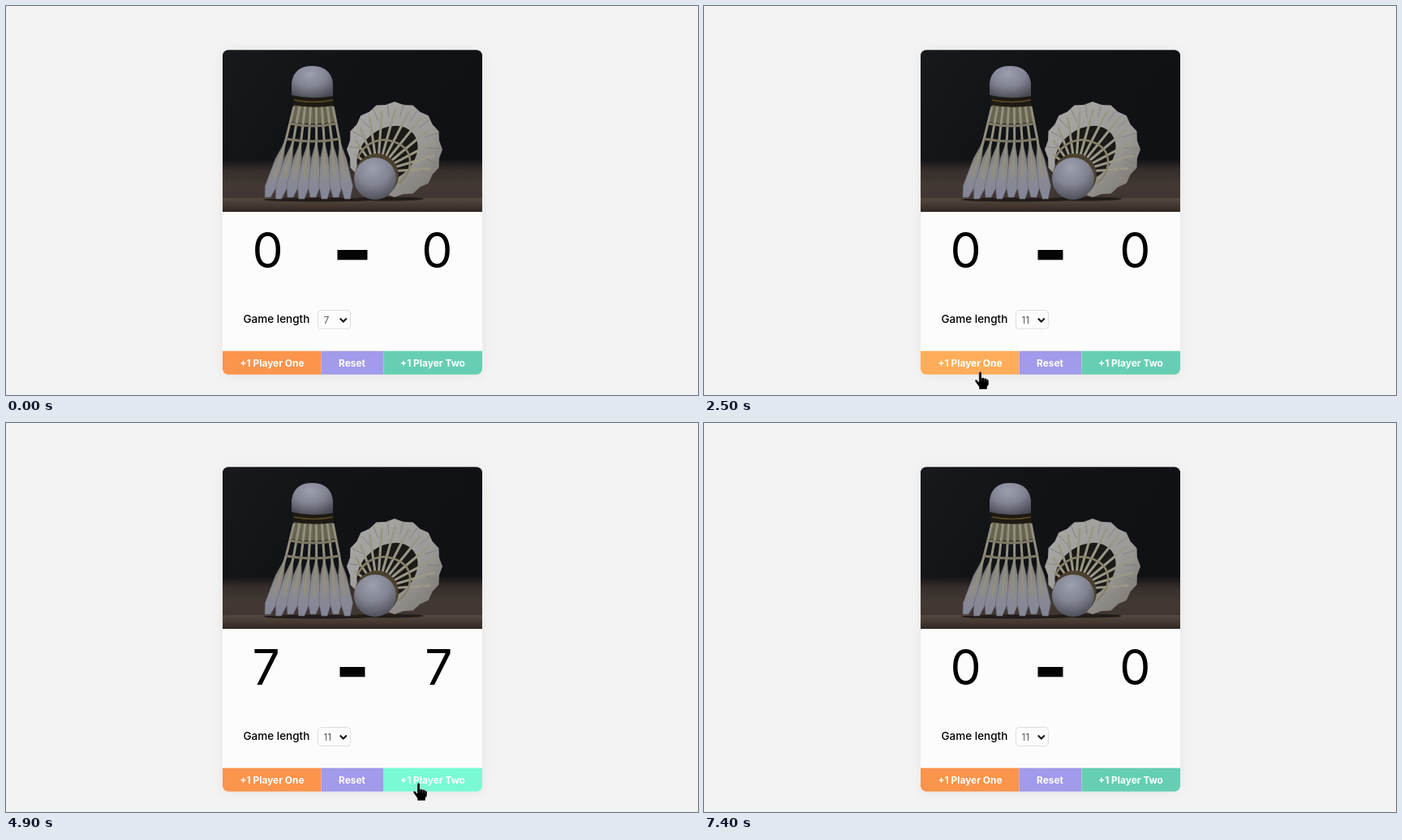
Write an HTML page that moves like this. It is 853 px wide and 480 px high and loops after 7.5 s.

```html
<!DOCTYPE html>
<html lang="en">
<head>
<meta charset="utf-8">
<title>Score keeper</title>
<style>
  html, body { margin: 0; width: 100%; height: 100%; overflow: hidden; background: #f3f3f3; }
  svg { display: block; width: 853px; height: 480px; font-family: Inter, Roboto, sans-serif; }
  .card { filter: drop-shadow(0 1px 7px rgba(0, 0, 0, .06)); }
  .score { font-size: 60.5px; letter-spacing: 3px; }
  .label { font-size: 13.5px; font-weight: 500; }
  .btn { font-size: 11.9px; font-weight: 700; fill: #fff; text-anchor: middle; }
</style>
</head>
<body>
<svg viewBox="0 0 853 480">
  <defs>
    <clipPath id="round"><rect x="267" y="54.3" width="320" height="400.4" rx="7"/></clipPath>
    <linearGradient id="wall" x2="1" y2=".3">
      <stop offset="0" stop-color="#18191d"/><stop offset=".45" stop-color="#121317"/><stop offset="1" stop-color="#101115"/>
    </linearGradient>
    <linearGradient id="ground" x2="0" y2="1">
      <stop offset="0" stop-color="#151417"/><stop offset=".2" stop-color="#352e2b"/>
      <stop offset=".5" stop-color="#433934"/><stop offset="1" stop-color="#3c332e"/>
    </linearGradient>
    <linearGradient id="wood" x2="0" y2="1">
      <stop offset="0" stop-color="#54493f"/><stop offset=".5" stop-color="#453a32"/><stop offset="1" stop-color="#2f2722"/>
    </linearGradient>
    <linearGradient id="vane" gradientUnits="userSpaceOnUse" x1="0" y1="165" x2="0" y2="238">
      <stop offset="0" stop-color="#7d7a6c"/><stop offset=".5" stop-color="#8b8b8e"/><stop offset="1" stop-color="#83869a"/>
    </linearGradient>
    <linearGradient id="fan" x2="1" y2="1">
      <stop offset="0" stop-color="#aaa9a6"/><stop offset=".6" stop-color="#9c9a98"/><stop offset="1" stop-color="#757069"/>
    </linearGradient>
    <radialGradient id="cork" cx=".45" cy=".25" r=".8">
      <stop offset="0" stop-color="#9c9fb0"/><stop offset=".5" stop-color="#828492"/><stop offset="1" stop-color="#484952"/>
    </radialGradient>
  </defs>

  <rect width="853" height="480" fill="#f3f3f3"/>
  <rect class="card" x="267" y="54.3" width="320" height="400.4" rx="7" fill="#fcfcfc"/>

  <g clip-path="url(#round)">
    <rect x="267" y="54" width="321" height="145" fill="url(#wall)"/>
    <rect x="267" y="190" width="321" height="64" fill="url(#ground)"/>
    <rect x="267" y="237" width="321" height="17" fill="url(#wood)"/>
    <ellipse cx="385" cy="239" rx="68" ry="2.5" fill="#211c1a"/>
    <ellipse cx="470" cy="238" rx="45" ry="2.5" fill="#211c1a"/>
    <g id="fallen"></g>
    <circle cx="457" cy="209" r="27" fill="#4b412e"/>
    <circle cx="455" cy="213" r="26" fill="url(#cork)"/>
    <g id="standing"></g>
    <path d="M354 111H403L404 123Q379 127 353 122Z" fill="#1d1a13"/>
    <path d="M355 116Q379 121 403 116" fill="none" stroke="#5a4a25" stroke-width="1.5"/>
    <path d="M352 110V95Q355 74 377 74Q400 74 403 95V111Q377 116 352 110Z" fill="url(#cork)"/>

    <rect id="b0" x="267" y="425.7" width="121.5" height="29.3"/>
    <rect id="b1" x="388.5" y="425.7" width="77" height="29.3"/>
    <rect id="b2" x="465.5" y="425.7" width="122" height="29.3"/>
  </g>

  <text class="btn" x="328" y="444.5">+1 Player One</text>
  <text class="btn" x="426.5" y="444.5">Reset</text>
  <text class="btn" x="526" y="444.5">+1 Player Two</text>

  <text id="one" class="score" x="303.5" y="323"></text>
  <text id="two" class="score" x="553.5" y="323" text-anchor="end"></text>
  <rect id="dash" y="301" height="12.3" fill="#050505"/>
  <text id="over" x="427" y="310.5" font-size="10" fill="#fff" text-anchor="middle">(Game Over)</text>

  <text class="label" x="292.5" y="391">Game length</text>
  <rect x="384.5" y="375.5" width="40" height="23" rx="4" fill="#fdfdfd" stroke="#dedede"/>
  <text id="length" x="391.5" y="391.5" font-size="12.3" font-weight="300" fill="#333"></text>
  <path d="M411.8 385.5L415.8 389.5L419.8 385.5" fill="none" stroke="#111" stroke-width="2"/>

  <g id="cursor">
    <path id="arrow" d="M0 0V16L4 12.5L6.8 18.5L9.3 17.3L6.6 11.6H11.8Z" fill="#000" stroke="#fff" stroke-width=".8"/>
    <g id="hand" transform="translate(-.5 -1)">
      <path d="M-1.7 1.5Q0 -1.5 1.7 1.5V8Q4 6.7 5 8.6Q7 7.6 8 9.6Q10 9 10.5 11.5V16L8.5 19V22H-1.5V19L-6.5 12Q-7 9.5 -4.5 10L-1.7 13Z" fill="#000" stroke="#fff" stroke-width=".5"/>
      <path d="M1.8 8V12M5 9V12.5M8 10V13" stroke="#777" stroke-width=".5"/>
    </g>
    <g id="ban" fill="none" stroke="#d3301f" stroke-width="2.4">
      <circle r="6.2" fill="#fff"/><path d="M-4.2 -4.2L4.2 4.2"/>
    </g>
  </g>
</svg>
<script>
const $ = id => document.getElementById(id);
const mix = (a, b, k) => a + (b - a) * k;
const path = (d, fill, stroke = "none", w = 1) =>
  `<path d="${d}" fill="${fill}" stroke="${stroke}" stroke-width="${w}"/>`;

// Standing shuttlecock: u runs across the skirt
function skirtX(u, y) {
  return y < 165
    ? mix(355 + 48 * u, 345 + 66 * u, (y - 124) / 41)
    : mix(345 + 66 * u, 323 + 98 * u, (y - 165) / 71);
}
function standing() {
  let s = path("M355 122H403L406 143Q379 148 350 143Z", "#67644f");
  for (let i = 0; i < 8; i++) {
    const u = i / 7, x = y => skirtX(u, y), tip = 236 + i % 2 * 2;
    s += path(`M${x(166)} 166L${x(190) + 5} 188L${x(225) + 8} 222L${x(tip) + 3} ${tip}` +
      `L${x(tip) - 4} ${tip}L${x(225) - 7} 222L${x(190) - 5} 188Z`, "url(#vane)", "#65656a", .6);
    s += path(`M${x(124)} 124L${x(165)} 165L${x(212)} 212`, "none", "#928f7e", 3);
  }
  for (const y of [145, 164])
    s += path(`M${skirtX(0, y)} ${y}Q379 ${y + 6} ${skirtX(1, y)} ${y}`, "none", "#7d7966", 3);
  return s;
}

// Fallen shuttlecock: a ragged disc with ribs running to the cork
function fallen() {
  const at = (a, r) => [479 + Math.cos(a) * r, 177 + Math.sin(a) * r];
  let rim = [], ribs = "", hub = [458, 205];
  for (let i = 0; i < 32; i++) rim.push(at(i * Math.PI / 16, i % 2 ? 56 : 59));
  for (let i = 0; i < 12; i++) {
    const a = -3.25 + i * .34;
    ribs += path(`M${hub}L${at(a, 50)}`, "none", "#9a9787", 3);
    ribs += path(`M${at(a + .14, 40)}L${at(a + .17, 57)}`, "none", "#7d7b78", .8);
  }
  return path(`M${rim.join("L")}Z`, "url(#fan)") +
    `<ellipse cx="470" cy="183" rx="41" ry="31" fill="#1c1a17" transform="rotate(-38 470 183)"/>` + ribs +
    path("M433 188Q443 166 467 165Q496 169 498 190Q499 207 484 219", "none", "#86816a", 2.5);
}
$("standing").innerHTML = standing();
$("fallen").innerHTML = fallen();

const LOOP = 7500, RESET = 6800;
// Pointer track: time, x, y
const track = [
  [700, 807, 465], [800, 515, 430], [1000, 515, 430], [1100, 428, 447], [1500, 406, 389],
  [1900, 404, 390], [2300, 352, 442], [2500, 341, 452], [2700, 339, 451], [3500, 335, 449],
  [3800, 335, 448], [4000, 430, 454], [4200, 509, 445], [5100, 509, 445], [5400, 511, 447],
  [5600, 495, 439], [5900, 315, 435], [6200, 330, 436], [6500, 500, 436], [6700, 428, 434], [7300, 428, 434]
];
function pointer(t) {
  const i = track.findIndex(p => p[0] > t);
  if (i < 1) return null;
  const [a, b] = [track[i - 1], track[i]], k = (t - a[0]) / (b[0] - a[0]);
  return [mix(a[1], b[1], k), mix(a[2], b[2], k)];
}

const plain = ["#fb944c", "#a29aea", "#66ceb3"];
const lit = ["#ffad5a", "#c0b8ff", "#7af9d5"];
const off = ["#ab9d95", "#a29aea", "#adb6b2"];
const clicks = (t, start, max) => Math.max(0, Math.min(max, Math.floor((t - start) / 125)));
const show = (id, on) => $(id).style.display = on ? "" : "none";

function draw(now) {
  const t = Math.floor(now % LOOP / 100) * 100;
  const live = t < RESET;
  const one = live ? clicks(t, 2600, 7) : 0;
  const two = live ? clicks(t, 4025, 11) : 0;
  const over = two === 11, long = t >= 1800;

  $("one").textContent = one;
  $("two").textContent = two;
  $("one").setAttribute("fill", over ? "#d33f22" : "#000");
  $("two").setAttribute("fill", over ? "#35860a" : "#000");
  $("length").textContent = long ? 11 : 7;

  const w = over ? 58 : long ? 31 : 37;
  $("dash").setAttribute("x", 427 - w / 2);
  $("dash").setAttribute("width", w);
  show("over", over);

  const p = pointer(t);
  let hit = -1;
  if (p && p[1] >= 426 && p[1] < 455 && p[0] < 588) hit = p[0] < 388 ? 0 : p[0] < 465 ? 1 : 2;
  const banned = over && (hit === 0 || hit === 2);
  for (let i = 0; i < 3; i++) {
    const tone = over && i !== 1 ? off : i === hit ? lit : plain;
    $("b" + i).setAttribute("fill", tone[i]);
  }
  show("cursor", p);
  if (p) $("cursor").setAttribute("transform", `translate(${p})`);
  show("ban", banned);
  show("hand", hit >= 0 && !banned);
  show("arrow", hit < 0);
}

const start = performance.now();
function tick() {
  draw(performance.now() - start);
  requestAnimationFrame(tick);
}
tick();
</script>
</body>
</html>
```
